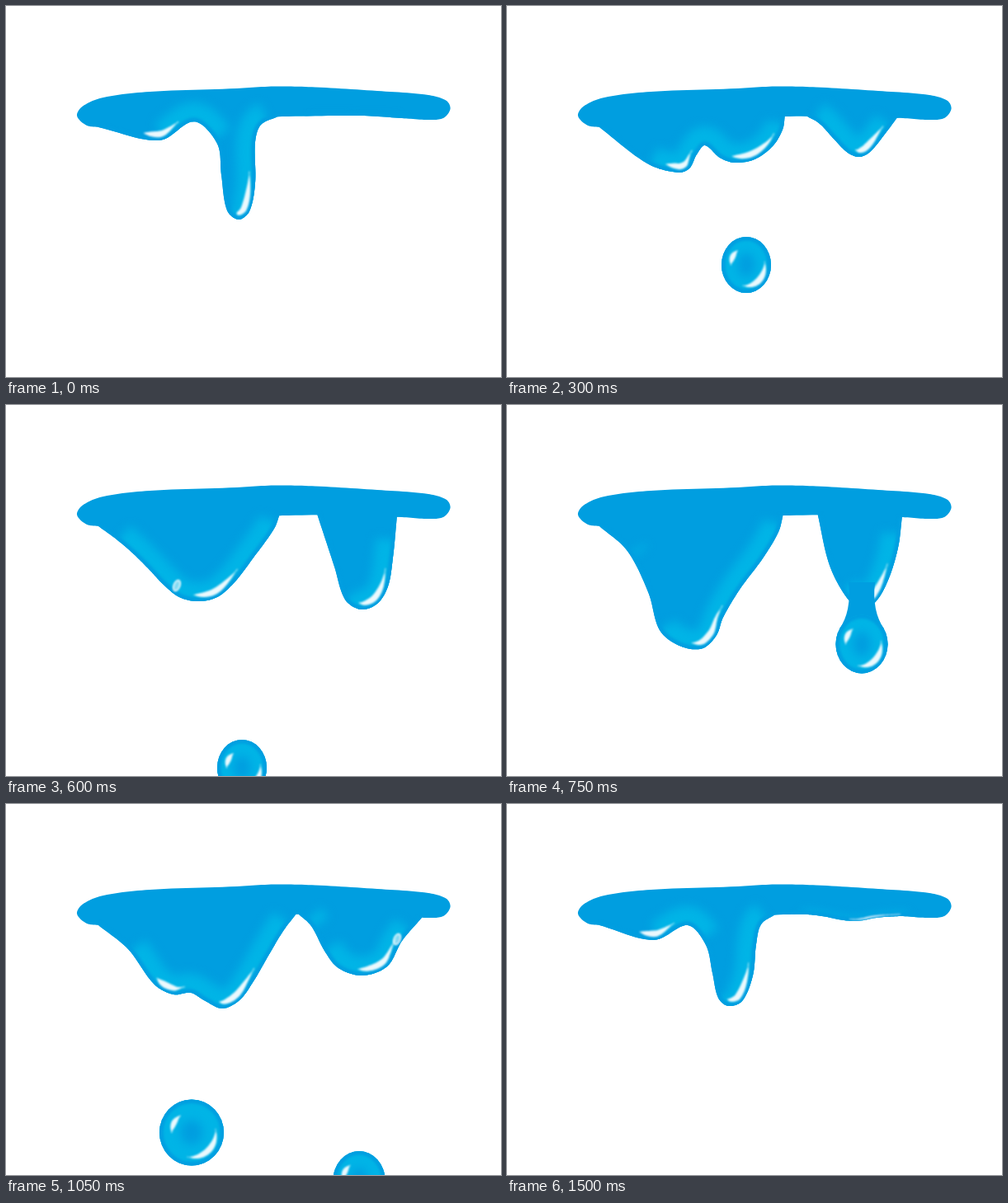
An HTML page with a canvas that plays this animation: 600 by 450 pixels, repeating every 1650 ms.

```html
<!DOCTYPE html>
<html lang="en">
<head>
<meta charset="utf-8">
<title>Dripping paint</title>
<style>
  html, body { margin: 0; width: 100%; height: 100%; overflow: hidden; background: #fff; }
  canvas { display: block; width: 600px; height: 450px; }
</style>
</head>
<body>
<canvas id="stage" width="600" height="450"></canvas>
<script>
const ctx = document.getElementById('stage').getContext('2d');
const STEP = 150, STEPS = 11;
const BLUE = '#009ee0', LIGHT = '#00b4e6';
const BAR_Y = 135;

const points = text => text.trim().split(/\s+/).map(p => p.split(',').map(Number));
const keys = [];
const key = (step, left, right, dots = '') =>
  keys.push({ step, sides: [points(left), points(right)], dots: dots ? points(dots) : [] });

const bar = curve(points(`112,147 97,144.5 86,133 93,121.5 118,111 174,104 280,100 325,97.5
  375,98.5 450,103 512,108 534,115 538.5,125 530,136 512,138 480,136 430,133 335,134`));

// Lower edges of the left and right drips, each read from right to left
key(0, `330,134 309,144 302,165 302,215 295,249 282,259 268,248 261,205 256,167 228,140 186,163 112,147`,
  `490,134 470,134 450,133 430,133 410,132 390,132 375,132 362,132`);
key(2, `337,132 334,150 322,170 300,186 276,190 258,184 240,169 230,180 221,197 207,202 170,191 112,147`,
  `474,134 459,154 440,177 427,183 413,178 396,161 378,142 360,132`);
key(4, `332,132 325,150 300,185 277,215 256,233 233,238 210,233 190,217 175,201 155,181 134,163 112,147`,
  `474,134 469,185 463,220 450,241 430,248 411,236 398,196 377,132`, `207,219`);
key(6, `338,132 333,158 320,187 288,231 268,282 274,322 262,358 228,367 195,345 188,275 157,190 112,147`,
  `484,135 479,161 460,207 441,239 428,243 414,233 384,193 376,132`, `208,318 315,178 460,193`);
key(7, `352,133 336,154 318,184 300,215 283,238 262,248 240,238 224,229 203,231 180,219 148,176 112,147`,
  `504,138 480,166 462,197 432,208 403,199 386,178 370,148 354,133`, `474,164`);
key(8, `338,137 320,152 302,171 283,187 260,194 240,190 217,171 203,170 185,176 163,178 138,167 112,147`,
  `508,138 485,150 462,161 425,168 395,164 372,153 352,143 337,137`);
key(10, `325,134 308,146 302,170 298,208 285,239 268,245 256,235 249,205 241,171 219,147 178,165 112,147`,
  `500,135 475,136 448,138 425,142 405,140.5 385,136.5 365,134 345,133`);

// Each drop lets go at step "born"; "hang" is its height one step earlier
const drops = [
  { born: 2, x: 290, y: 314, rx: 30, ry: 34, speed: 35, drift: -2, hang: 275 },
  { born: 6, x: 430, y: 377.5, rx: 31.5, ry: 35.5, speed: 65, drift: -2, hang: 290 },
  { born: 7, x: 225, y: 398.5, rx: 39, ry: 40, speed: 54, drift: 3 }
];
const GRAVITY = 14;

// Samples a smooth line through the points, tangents scaled by chord length
function curve(pts) {
  const at = i => pts[Math.min(pts.length - 1, Math.max(0, i))];
  const gap = (a, b) => Math.hypot(b[0] - a[0], b[1] - a[1]);
  const handle = (i, side) => {
    const a = at(i - 1), p = at(i), b = at(i + 1);
    const before = gap(a, p), after = gap(p, b);
    const k = (side > 0 ? after : -before) / (before + after) / 3;
    return p.map((v, n) => v + (b[n] - a[n]) * k);
  };
  const out = [pts[0]];
  for (let i = 0; i < pts.length - 1; i++) {
    const a = at(i), b = handle(i, 1), c = handle(i + 1, -1), d = at(i + 1);
    for (let j = 1; j <= 12; j++) {
      const t = j / 12, u = 1 - t;
      out.push(a.map((v, n) => u * u * u * v + 3 * u * u * t * b[n] + 3 * u * t * t * c[n] + t * t * t * d[n]));
    }
  }
  return out;
}

function trace(line, path = new Path2D()) {
  line.forEach(([x, y], i) => i ? path.lineTo(x, y) : path.moveTo(x, y));
  return path;
}

// Edge parts that catch light: all but the steep left-facing ones
function litPart(line) {
  const path = new Path2D(), end = line.length * .9;
  for (let i = 8; i < end; i++) {
    const [x0, y0] = line[i - 1], [x, y] = line[i];
    if (y0 - y > 1.6 * Math.abs(x - x0)) path.moveTo(x, y);
    else { if (i === 8) path.moveTo(x0, y0); path.lineTo(x, y); }
  }
  return path;
}

// Blurred light along the edge, then a dark rim over it
function light(lit, edge, width) {
  ctx.lineJoin = 'round';
  ctx.filter = 'blur(6px)';
  ctx.strokeStyle = LIGHT;
  ctx.lineWidth = width;
  ctx.stroke(lit);
  ctx.filter = 'blur(1.5px)';
  ctx.strokeStyle = BLUE;
  ctx.lineWidth = 9;
  ctx.stroke(edge);
}

// Tapered white stroke along a line
function shine(line, radius, taper = 1) {
  ctx.save();
  ctx.filter = 'blur(0.8px)';
  ctx.fillStyle = 'rgba(255,255,255,.92)';
  ctx.beginPath();
  line.forEach(([x, y], i) => {
    const t = i / (line.length - 1);
    const r = Math.max(.6, radius * Math.max(0, Math.sin(Math.PI * t ** taper)));
    ctx.moveTo(x + r, y);
    ctx.arc(x, y, r, 0, Math.PI * 2);
  });
  ctx.fill();
  ctx.restore();
}

// Every low point of an edge gets a reflection that runs up to its right
function shineTips(line) {
  const length = [0];
  for (let i = 1; i < line.length; i++) {
    length[i] = length[i - 1] + Math.hypot(line[i][0] - line[i - 1][0], line[i][1] - line[i - 1][1]);
  }
  const inset = (s, depth) => {
    const i = Math.min(line.length - 1, Math.max(1, length.findIndex(l => l >= s)));
    const t = (s - length[i - 1]) / (length[i] - length[i - 1]);
    const [x, y] = line[i - 1], dx = line[i][0] - x, dy = line[i][1] - y, d = Math.hypot(dx, dy);
    return [x + dx * t - dy / d * depth, y + dy * t + dx / d * depth];
  };
  for (let i = 1; i < line.length - 1; i++) {
    const y = line[i][1];
    if (y < BAR_Y + 3 || y < line[i - 1][1] || y <= line[i + 1][1]) continue;
    let top = i;
    while (top > 0 && line[top - 1][1] <= line[top][1]) top--;
    const size = Math.min(1, (y - BAR_Y) / 25);
    const ahead = Math.min(66, .7 * (length[i] - length[top]));
    const from = length[i] + 6 + Math.max(0, 50 - ahead) * .7, to = length[i] - ahead;
    const mark = [];
    for (let n = 0; n <= 50; n++) mark.push(inset(from + (to - from) * n / 50, 7.5 * size));
    shine(mark, 3.7 * size, .75);
  }
}

function dot([x, y]) {
  ctx.save();
  ctx.filter = 'blur(0.8px)';
  ctx.beginPath();
  ctx.ellipse(x, y, 3.5, 6.5, .4, 0, Math.PI * 2);
  ctx.fillStyle = 'rgba(255,255,255,.5)';
  ctx.fill();
  ctx.strokeStyle = 'rgba(255,255,255,.85)';
  ctx.lineWidth = 2;
  ctx.stroke();
  ctx.restore();
}

function paintDrips(edges) {
  const body = trace(bar);
  body.closePath();
  for (const line of edges) {
    trace([...line, [line[line.length - 1][0], 118], [line[0][0], 118]], body);
    body.closePath();
  }
  ctx.save();
  ctx.fillStyle = BLUE;
  ctx.fill(body);
  ctx.clip(body);
  for (const line of edges) {
    const depth = Math.max(...line.map(p => p[1])) - BAR_Y;
    light(litPart(line), trace(line), 46 * Math.min(1, Math.max(.01, depth / 40)));
  }
  ctx.restore();
  edges.forEach(shineTips);
}

function paintDrop(x, y, rx, ry) {
  const arc = (from, to, k) => Array.from({ length: 31 }, (_, i) => {
    const a = (from + (to - from) * i / 30) * Math.PI / 180;
    return [x + rx * k * Math.cos(a), y + ry * k * Math.sin(a)];
  });
  const edge = trace(arc(0, 360, 1));
  for (let i = 0; i < 2; i++) edge.addPath(trace(arc(i * 180, i * 180 + 180, 1)));
  const round = new Path2D();
  round.ellipse(x, y, rx, ry, 0, 0, Math.PI * 2);
  ctx.save();
  ctx.fillStyle = BLUE;
  ctx.fill(round);
  ctx.clip(round);
  light(round, round, rx * 1.3);
  ctx.restore();
  shine(arc(100, -8, .75), 3.7);
  shine(arc(180, 235, .62), 3.2);
}

function paintNeck(x, y, rx, ry) {
  const side = (dir, k) => [x + dir * k, 0][0];
  ctx.fillStyle = BLUE;
  ctx.beginPath();
  ctx.moveTo(side(-1, 16), y - 75);
  ctx.quadraticCurveTo(side(-1, 12), y - 40, side(-1, rx * .87), y - ry * .5);
  ctx.lineTo(side(1, rx * .87), y - ry * .5);
  ctx.quadraticCurveTo(side(1, 12), y - 40, side(1, 16), y - 75);
  ctx.fill();
}

// A step between two keys takes the shape halfway
function edgesAt(step) {
  const a = keys.findLast(k => k.step <= step), b = keys.find(k => k.step >= step);
  return a.sides.map((side, s) =>
    curve(side.map((p, i) => p.map((v, n) => (v + b.sides[s][i][n]) / 2))));
}

function paint(step) {
  ctx.fillStyle = '#fff';
  ctx.fillRect(0, 0, 600, 450);
  paintDrips(edgesAt(step));
  const exact = keys.find(k => k.step === step);
  if (exact) exact.dots.forEach(dot);
  for (const { born, x, y, rx, ry, speed, drift, hang } of drops) {
    const n = step - born;
    if (n >= 0) paintDrop(x + drift * n, y + speed * n + GRAVITY * n * n, rx, ry);
    if (n === -1 && hang) {
      paintNeck(x, hang, rx, ry);
      paintDrop(x, hang, rx, ry);
    }
  }
}

const start = performance.now();
let shown = -1;
function tick(now) {
  const step = Math.floor(Math.max(0, now - start) / STEP) % STEPS;
  if (step !== shown) paint(shown = step);
  requestAnimationFrame(tick);
}
tick(start);
</script>
</body>
</html>
```
